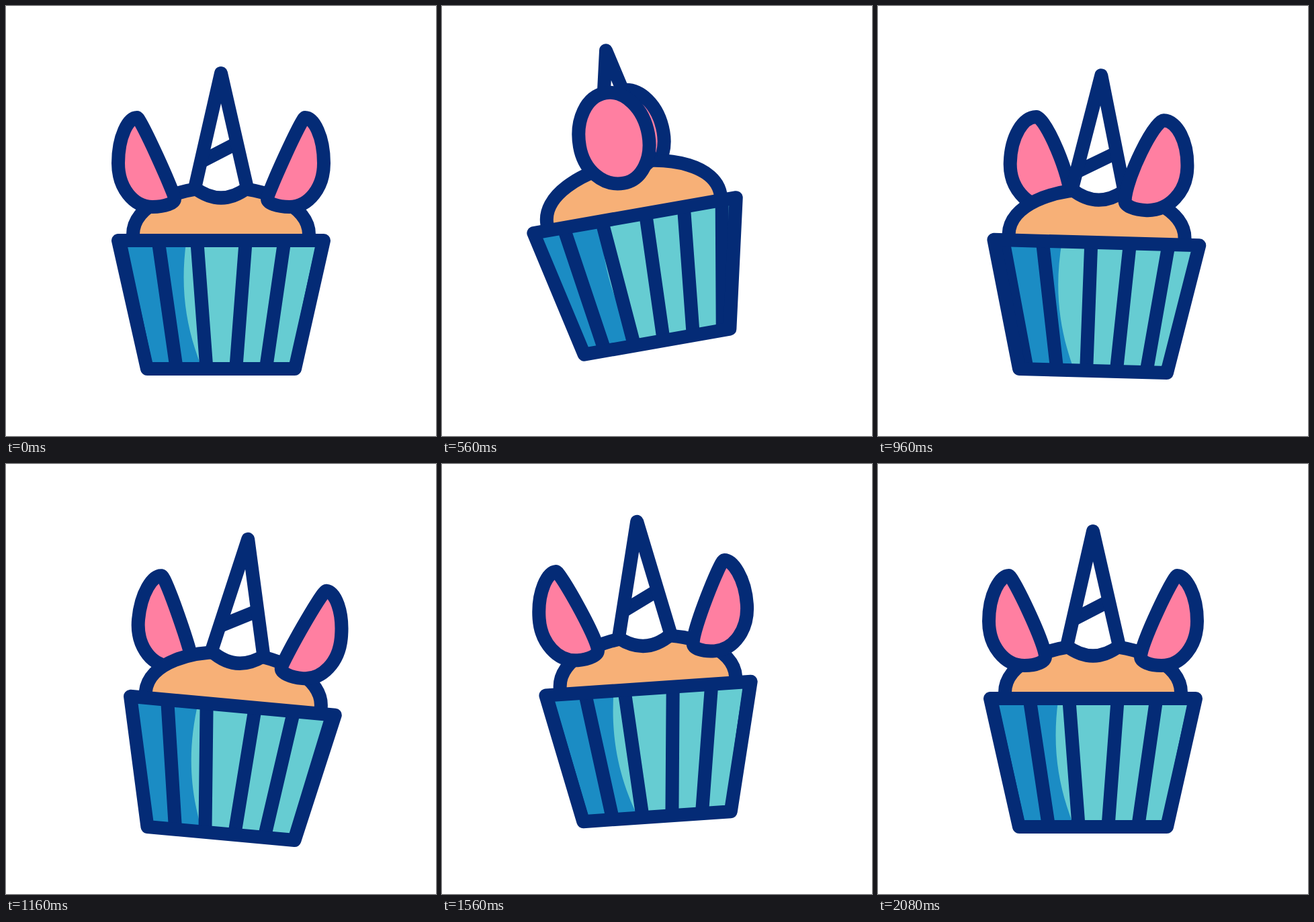
Write an HTML page that moves like this. It is 640 by 640 pixels and loops after 3 s.

```html
<!DOCTYPE html>
<html lang="en">
<head>
<meta charset="utf-8">
<title>Unicorn cupcake</title>
<style>
  html, body { margin: 0; width: 100%; height: 100%; overflow: hidden; background: #fff; }
  svg { display: block; width: 100vw; height: 100vh; }
  .line { stroke: #042b76; stroke-width: 20; stroke-linejoin: round; stroke-linecap: round; }
  .ear { fill: #ff7fa1; }
</style>
</head>
<body>
<svg viewBox="0 0 640 640">
  <defs>
    <clipPath id="cupClip"><path d="M167 349H473L430 540H210Z"/></clipPath>
    <clipPath id="hornClip"><path d="M320 100L281 271Q320 300 359 271Z"/></clipPath>
  </defs>
  <g id="cake">
    <path id="earBehind" class="line ear"/>
    <path class="line" fill="#f7b077" d="M189 349V340C189 298 250 270 320 270S451 298 451 340V349"/>
    <path fill="#fff" d="M320 100L281 271Q320 300 359 271Z"/>
    <g clip-path="url(#hornClip)"><path id="hornStripes" class="line" d="M260 247.4L380 185.4M260 342.4L380 280.4"/></g>
    <path class="line" fill="none" d="M320 100L281 271Q320 300 359 271Z"/>
    <path id="earOver" class="line ear"/>
    <path id="earFront" class="line ear"/>
    <g clip-path="url(#cupClip)">
      <path fill="#66ccd2" d="M160 340H480V550H160Z"/>
      <path fill="#1b8cc4" d="M160 345H269C258 420 268 480 292 540H160Z"/>
      <path id="pleats" class="line" fill="none"/>
    </g>
    <path class="line" fill="none" d="M167 349H473L430 540H210Z"/>
  </g>
</svg>
<script>
const LOOP = 3000, STEP = 20, TURN = 1200;
const byId = id => document.getElementById(id);
const clamp = v => Math.max(0, Math.min(1, v));
const smooth = u => u * u * (3 - 2 * u);
const mix = (a, b, u) => a + (b - a) * u;

// [time, value] keys of the hop and the sway
const HOP = [[0, 0], [360, -21], [545, -40.5], [760, -18], [960, 3], [1095, 12], [1360, -7.5],
  [1490, -18.5], [1640, -9], [1760, -2.2], [1870, 1.5], [2080, 0]];
const SWAY = [[0, 0], [360, -4.6], [575, -10], [760, -6.3], [960, 1.6], [1140, 5.3], [1360, 1.2],
  [1610, -4.3], [1760, -2.6], [1960, 0.6], [2080, 0]];

// Monotone cubic through the keys, flat at the turning points
function curve(keys, t) {
  const last = keys.length - 1;
  if (t >= keys[last][0]) return keys[last][1];
  const i = keys.findIndex(k => k[0] > t) - 1;
  const rate = j => (keys[j + 1][1] - keys[j][1]) / (keys[j + 1][0] - keys[j][0]);
  const slope = j => {
    if (j === 0 || j === last) return 0;
    const a = rate(j - 1), b = rate(j);
    return a * b <= 0 ? 0 : 2 * a * b / (a + b);
  };
  const [t0, v0] = keys[i], [t1, v1] = keys[i + 1];
  const span = t1 - t0, u = (t - t0) / span;
  return mix(v0, v1, smooth(u))
    + span * u * (1 - u) * ((1 - u) * slope(i) - u * slope(i + 1));
}

// One side of an ear: e = 0 is the inner corner, e = 1 the outer bulge
function earSide(e, settled) {
  const bulge = Math.sin(Math.PI * e);
  const nudge = settled ? (e < 0.5 ? -2 : 2) : 0;
  return {
    x: 222 * e - 69 + 10 * bulge - 3 * Math.sin(2 * Math.PI * e) + nudge,
    y: 234 + 53 * (1 - smooth(clamp((e - 0.1) / 0.26))),
    up: mix(settled ? 20 : 8, 40, clamp(e / 0.15)),
    tip: 5 + 20 * bulge + 8 * e
  };
}

function earPath(p, dir, settled) {
  const r = earSide(p, settled), l = earSide(1 - p, settled);
  l.x = -l.x;
  const tipX = 250 * p - 125, tipY = 166 - 4 * Math.sin(Math.PI * p);
  const lowX = 204 * p - 102 + 6 * Math.sin(2 * Math.PI * p), lowY = settled ? 300 : 299;
  const at = (x, y) => `${(320 + dir * x).toFixed(2)} ${y.toFixed(2)} `;
  const drop = s => s.y + 0.55 * (lowY - s.y);
  const reach = s => lowX + 0.57 * (s.x - lowX);
  return 'M' + at(tipX, tipY)
    + 'C' + at(tipX - l.tip, tipY) + at(l.x, l.y - l.up) + at(l.x, l.y)
    + 'C' + at(l.x, drop(l)) + at(reach(l), lowY) + at(lowX, lowY)
    + 'C' + at(reach(r), lowY) + at(r.x, drop(r)) + at(r.x, r.y)
    + 'C' + at(r.x, r.y - r.up) + at(tipX + r.tip, tipY) + at(tipX, tipY) + 'Z';
}

const PLEAT_TOPS = [-194, -137, -79, -8, 49, 106, 171, 228, 285, 356, 413, 470];

function pleatPath(p) {
  return PLEAT_TOPS.map((x, i) => {
    const top = x + 364 * p, low = 343 + 45.3 * (i - 9) + 272 * p;
    const lean = (low - top) / 171;
    return `M${top - 19 * lean} 340L${low + 20 * lean} 550`;
  }).join('');
}

function draw(t) {
  const u = clamp(t / TURN), p = 0.82 * smooth(u) + 0.18 * u;
  const settled = u === 1, turning = u > 0 && !settled;
  const far = earPath(p, -1, settled);
  byId('cake').setAttribute('transform',
    `translate(0 ${curve(HOP, t)}) rotate(${curve(SWAY, t)} 320 540)`);
  byId('earFront').setAttribute('d', earPath(p, 1, settled));
  byId('earBehind').setAttribute('d', turning ? far : '');
  byId('earOver').setAttribute('d', turning ? '' : far);
  byId('hornStripes').setAttribute('transform', `translate(0 ${-95 * p})`);
  byId('pleats').setAttribute('d', pleatPath(p));
}

const start = performance.now();
function tick() {
  const t = (performance.now() - start) % LOOP;
  draw(Math.floor(t / STEP) * STEP);
  requestAnimationFrame(tick);
}
draw(0);
requestAnimationFrame(tick);
</script>
</body>
</html>
```
